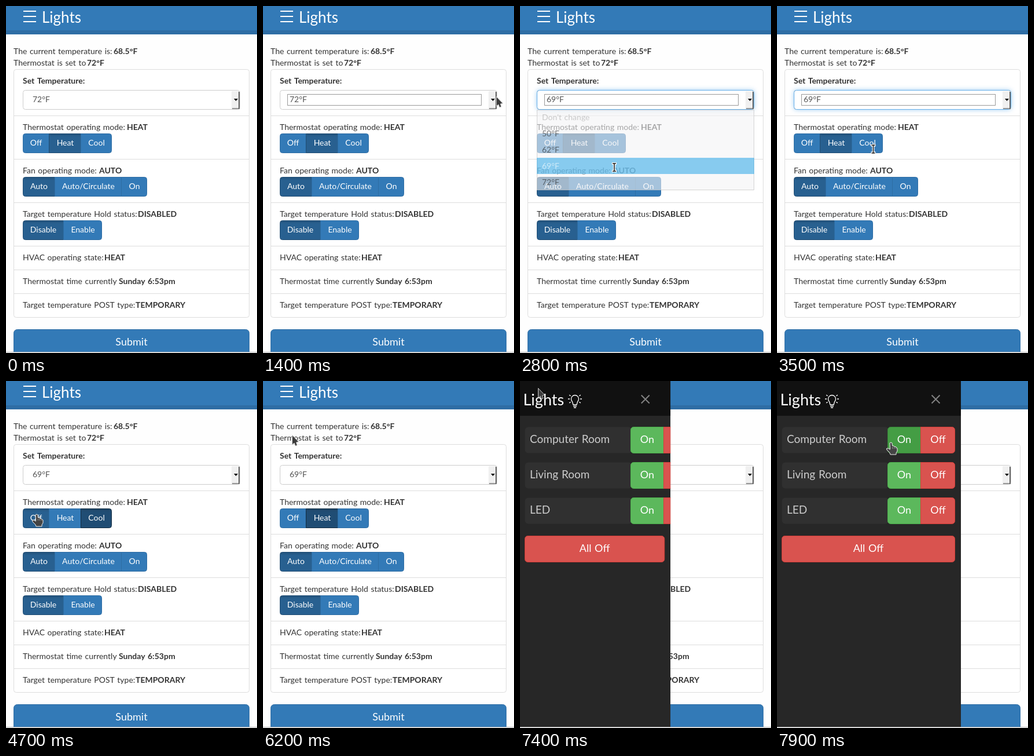
These frames come from a looping animation (434 px wide and 599 px high, 8 s). An HTML page with a canvas:

```html
<!DOCTYPE html>
<html lang="en">
<head>
<meta charset="utf-8">
<title>Thermostat panel</title>
<style>
html, body { margin: 0; width: 100%; height: 100%; overflow: hidden; background: #fefefe; }
canvas { display: block; }
</style>
</head>
<body>
<canvas id="stage" width="434" height="599"></canvas>
<script>
const ctx = document.getElementById('stage').getContext('2d');
const LOOP = 8000, STEP = 100;
const BLUE = ['#337ab7', '#2e6da4'], ACTIVE = ['#286090', '#204d74'], FOCUS = ['#204d74', '#122b40'];
const GREEN = ['#5cb85c', '#4cae4c'], GREEN_HOVER = ['#449d44', '#398439'], RED = ['#d9534f', '#d43f3a'];
const TEMPS = ["Don't change", '50°F', '62°F', '69°F', '72°F'];

// Pointer path: time, x, y of the hot spot
const PATH = [
  [300, 276, 38], [1100, 403, 156], [1900, 403, 156], [2500, 163, 278], [2800, 163, 278],
  [3600, 167, 242], [3700, 166, 240], [4500, 166, 240], [4700, 53, 230], [5000, 41, 232],
  [5300, 41, 232], [5700, 104, 230], [6100, 104, 230], [6200, 50, 93], [6400, 20, 18],
  [6500, 9, 2], [6800, 31, 12], [7400, 31, 12], [7900, 197, 106]
];

const clamp = v => Math.min(1, Math.max(0, v));
const ramp = (t, start, length) => clamp((t - start) / length);

function pointerAt(t) {
  const i = PATH.findIndex(p => p[0] > t);
  if (i < 0) return PATH[PATH.length - 1].slice(1);
  const [t0, x0, y0] = PATH[i - 1], [t1, x1, y1] = PATH[i];
  const k = (t - t0) / (t1 - t0);
  return [x0 + (x1 - x0) * k, y0 + (y1 - y0) * k];
}

// CSS "ease" timing curve
function ease(x) {
  let lo = 0, hi = 1;
  for (let i = 0; i < 20; i++) {
    const s = (lo + hi) / 2;
    if (0.75 * s * (1 - s) + s ** 3 < x) lo = s; else hi = s;
  }
  return 0.3 * lo * (1 - lo) ** 2 + 3 * lo * lo * (1 - lo) + lo ** 3;
}

function fill(color, x, y, w, h) {
  ctx.fillStyle = color;
  ctx.fillRect(x, y, w, h);
}

function box(x, y, w, h, radius, color, border) {
  ctx.beginPath();
  ctx.roundRect(x + 0.5, y + 0.5, w - 1, h - 1, radius);
  if (color) { ctx.fillStyle = color; ctx.fill(); }
  if (border) { ctx.strokeStyle = border; ctx.lineWidth = 1; ctx.stroke(); }
}

function text(str, x, y, { size = 14, color = '#333', weight = 400, align = 'left' } = {}) {
  ctx.font = `${weight} ${size}px Lato, sans-serif`;
  ctx.fillStyle = color;
  ctx.textAlign = align;
  ctx.fillText(str, x, y);
}

function labelled(label, x, y, value, valueX) {
  text(label, x, y);
  text(value, valueX, y, { weight: 700 });
}

// Row of joined buttons; edges holds the n + 1 button borders
function buttonGroup(y, h, edges, labels, colors, { size = 14, radius = 4, baseline = 21 } = {}) {
  const last = labels.length - 1;
  labels.forEach((label, i) => {
    const x = edges[i], w = edges[i + 1] - x, [color, border] = colors[i];
    const l = i === 0 ? radius : 0, r = i === last ? radius : 0;
    box(x - (i ? 1 : 0), y, w + (i ? 1 : 0), h, [l, r, r, l], color, border);
    if (colors[i] === ACTIVE || colors[i] === FOCUS) {
      const shade = ctx.createLinearGradient(0, y, 0, y + 6);
      shade.addColorStop(0, 'rgba(0,0,0,.16)');
      shade.addColorStop(1, 'rgba(0,0,0,0)');
      fill(shade, x + 1, y + 1, w - 2, 6);
    }
    text(label, x + w / 2, y + baseline, { size, color: '#fff', align: 'center' });
  });
}

function modeColors(t) {
  const off = t < 4700 ? BLUE : t < 5000 ? ACTIVE : t < 6000 ? FOCUS : BLUE;
  const heat = t < 4200 ? ACTIVE : t < 5600 ? BLUE : t < 5900 ? ACTIVE : t < 7100 ? FOCUS : ACTIVE;
  const cool = t < 3600 ? BLUE : t < 4000 ? ACTIVE : t < 5000 ? FOCUS : t < 5200 ? ACTIVE : BLUE;
  return [off, heat, cool];
}

function drawSelect(t) {
  const glow = ramp(t, 1400, 200) * (1 - ramp(t, 3900, 300));
  ctx.save();
  ctx.shadowColor = `rgba(102,175,233,${0.7 * glow})`;
  ctx.shadowBlur = 8 * glow;
  box(29, 145, 376, 34, 4, '#fff');
  ctx.restore();
  box(29, 145, 376, 34, 4, null, '#ccc');
  if (glow) {
    ctx.globalAlpha = glow;
    box(29, 145, 376, 34, 4, null, '#66afe9');
    ctx.globalAlpha = 1;
  }
  text(t < 2800 ? '72°F' : '69°F', 46, 166, { color: '#555' });
  if (t >= 1400 && t < 4000) {
    ctx.setLineDash([1, 1]);
    box(42, 152, 336, 20, 0, null, '#333');
    ctx.setLineDash([]);
  }
  fill('#f0f0f0', 390, 147, 14, 31);
  fill('#999', 391, 176, 13, 2);
  fill('#666', 402, 148, 2, 30);
  polygon([[394, 160], [401, 160], [397.5, 164]], '#000');
}

function drawPopup(t, [, pointerY]) {
  const alpha = ramp(t, 1400, 300) * (1 - ramp(t, 2700, 250));
  if (!alpha) return;
  const hovered = Math.floor((pointerY - 178) / 28);
  const selected = t >= 2800 ? 3 : hovered > 0 ? hovered : 4;
  ctx.globalAlpha = alpha;
  fill('#f4f4f5', 29, 179, 376, 139);
  box(29, 179, 376, 139, 0, null, '#bbb');
  fill('#3daee9', 29, 178 + 28 * selected, 376, 28);
  TEMPS.forEach((label, i) => text(label, 38, 197 + 28 * i, {
    color: i === selected ? '#fff' : i ? '#222' : '#aaa'
  }));
  ctx.globalAlpha = 1;
}

function drawPage(t) {
  fill('#fefefe', 0, 0, 434, 599);
  fill('#337ab7', 0, 0, 434, 42);
  fill('#2e6da4', 0, 42, 434, 7);
  [8, 17, 26].forEach(y => fill('#fff', 30, y, 22, 2));
  text('Lights', 62, 28.5, { size: 26, color: '#fff' });

  labelled('The current temperature is:', 13, 83, '68.5°F', 186);
  labelled('Thermostat is set to', 13, 103, '72°F', 140);

  box(13, 109, 408, 429, 4, '#fff', '#ddd');
  [189, 264, 339, 414, 455, 496].forEach(y => fill('#ddd', 14, y, 406, 1));
  text('Set Temperature:', 29, 134, { weight: 700 });
  labelled('Thermostat operating mode:', 29, 214, 'HEAT', 209);
  labelled('Fan operating mode:', 29, 289, 'AUTO', 161);
  labelled('Target temperature Hold status:', 29, 364, 'DISABLED', 228);
  labelled('HVAC operating state:', 29, 439, 'HEAT', 170);
  labelled('Thermostat time currently', 29, 480, 'Sunday 6:53pm', 195);
  labelled('Target temperature POST type:', 29, 521, 'TEMPORARY', 224);

  drawSelect(t);
  buttonGroup(220, 34, [29, 75, 130, 183], ['Off', 'Heat', 'Cool'], modeColors(t));
  buttonGroup(295, 34, [29, 85, 200, 244], ['Auto', 'Auto/Circulate', 'On'], [ACTIVE, BLUE, BLUE]);
  buttonGroup(370, 34, [29, 100, 166], ['Disable', 'Enable'], [ACTIVE, BLUE]);
  buttonGroup(558, 46, [13, 421], ['Submit'], [BLUE], { size: 18, radius: 6, baseline: 28 });
  fill('#bbb', 0, 597, 434, 1);
  fill('#eee', 0, 598, 434, 1);
}

function drawBulb(x, y) {
  ctx.strokeStyle = '#fff';
  ctx.lineWidth = 1.3;
  ctx.beginPath();
  ctx.arc(x, y, 6.5, Math.PI * 0.75, Math.PI * 0.25);
  ctx.lineTo(x + 3, y + 10);
  ctx.lineTo(x - 3, y + 10);
  ctx.closePath();
  ctx.moveTo(x - 3, y + 12.5); ctx.lineTo(x + 3, y + 12.5);
  ctx.moveTo(x - 2, y + 15); ctx.lineTo(x + 2, y + 15);
  for (const deg of [-215, -180, -145, -35, 0, 35]) {
    const a = deg * Math.PI / 180, c = Math.cos(a), s = Math.sin(a);
    ctx.moveTo(x + 9 * c, y + 9 * s);
    ctx.lineTo(x + 12 * c, y + 12 * s);
  }
  ctx.stroke();
}

function drawSidebar(t) {
  const w = 318 * ease(ramp(t, 7090, 600));
  if (w < 1) return;
  ctx.save();
  ctx.beginPath();
  ctx.rect(0, 0, w, 597);
  ctx.clip();
  fill('#272727', 0, 0, w, 597);
  fill('#111', 0, 0, w, 60);
  text('Lights', 5.5, 41.5, { size: 27, color: '#fff' });
  drawBulb(95, 31);

  const closeX = w - 43.5;
  ctx.strokeStyle = '#818181';
  ctx.lineWidth = 2;
  ctx.beginPath();
  ctx.moveTo(closeX - 7, 24.5); ctx.lineTo(closeX + 7, 38.5);
  ctx.moveTo(closeX + 7, 24.5); ctx.lineTo(closeX - 7, 38.5);
  ctx.stroke();

  const big = { size: 18, radius: 6, baseline: 28 };
  ['Computer Room', 'Living Room', 'LED'].forEach((name, i) => {
    const y = 79 + 61 * i;
    box(8, y, 186, 46, 6, '#303030');
    text(name, 17, y + 28, { size: 19, color: '#ccc' });
    const on = i === 0 && t >= 7900 ? GREEN_HOVER : GREEN;
    buttonGroup(y, 46, [191, 249, 308], ['On', 'Off'], [on, RED], { ...big, radius: 5 });
  });

  if (w > 24) {
    box(8, 267, w - 18, 46, 5, ...RED);
    ctx.font = '400 18px Lato, sans-serif';
    const labelX = Math.max(25, w / 2 - 1 - ctx.measureText('All Off').width / 2);
    text('All Off', labelX, 295, { size: 18, color: '#fff' });
  }
  ctx.restore();
}

function polygon(points, color, border) {
  ctx.beginPath();
  points.forEach(([x, y]) => ctx.lineTo(x, y));
  ctx.closePath();
  ctx.fillStyle = color;
  ctx.fill();
  if (border) { ctx.strokeStyle = border; ctx.lineWidth = 1; ctx.stroke(); }
}

function drawPointer(t, [x, y]) {
  const overButton = (t >= 3600 && t < 6200) || t >= 7900;
  ctx.save();
  ctx.translate(x, y);
  ctx.lineJoin = 'round';
  if (overButton) {
    polygon([[-2, 1], [0, 0], [2, 1], [2.5, 6], [5, 6], [6, 7.5], [8.5, 7.5], [9.5, 9], [11, 10],
      [11, 15], [9, 18], [9, 21], [-1, 21], [-2, 18], [-7, 13], [-7.5, 10.5], [-5, 10], [-1.5, 12]],
      '#444', '#eee');
    ctx.strokeStyle = '#999';
    ctx.beginPath();
    [2.5, 5.5, 8.5].forEach(fx => { ctx.moveTo(fx, 8); ctx.lineTo(fx, 11); });
    ctx.stroke();
  } else if (t >= 2800 && t < 3600) {
    fill('#fff', -4, -8, 8, 4);
    fill('#fff', -4, 5, 8, 4);
    fill('#fff', -2, -8, 4, 17);
    fill('#222', -3, -7, 6, 1.5);
    fill('#222', -3, 6.5, 6, 1.5);
    fill('#222', -0.8, -7, 1.6, 15);
  } else {
    polygon([[0.5, 0.5], [0.5, 17], [4, 14], [6, 19], [9, 18], [7.5, 13], [11.5, 12]], '#3c3c3c', '#ccc');
  }
  ctx.restore();
}

function render(now) {
  const t = Math.floor((now % LOOP) / STEP) * STEP;
  const pointer = t >= 300 ? pointerAt(t) : null;
  ctx.wordSpacing = '1px';
  drawPage(t);
  if (pointer) drawPopup(t, pointer);
  drawSidebar(t);
  if (pointer) drawPointer(t, pointer);
}

const start = performance.now();
function frame() {
  render(performance.now() - start);
  requestAnimationFrame(frame);
}
frame();
</script>
</body>
</html>
```
